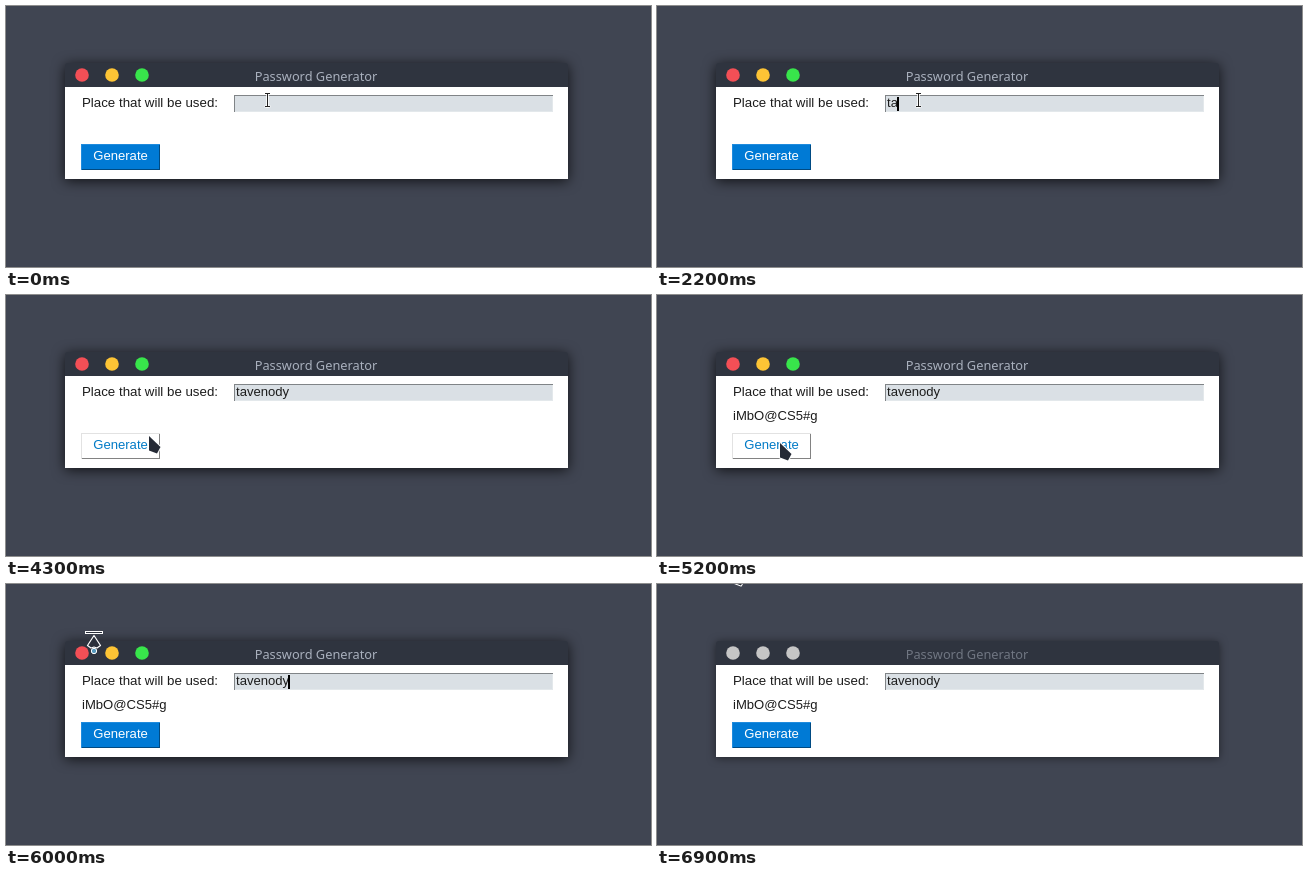
An HTML page with a canvas for the animation above (7.1 s loop, 645x261 px).

```html
<!DOCTYPE html>
<html lang="en">
<head>
<meta charset="utf-8">
<title>Password Generator</title>
<style>
  html, body { margin: 0; width: 100%; height: 100%; overflow: hidden; background: #404552; }
  canvas { display: block; }
</style>
</head>
<body>
<canvas id="stage" width="645" height="261"></canvas>
<script>
const ctx = document.getElementById('stage').getContext('2d');
const LOOP = 7100, STEP = 100;
const SANS = '"Liberation Sans", Arial, sans-serif';
const PLACE = 'tavenody', PASSWORD = 'iMbO@CS5#g';

const keyTimes = [2100, 2200, 2400, 2500, 2900, 3100, 3400, 3600];
const HOVER_IN = 4300, PRESS = 4700, RELEASE = 4900, HOVER_OUT = 5600, BLUR = 6900;

// Pointer stops: start time, shape, x, y
const pointer = [
  [0, beam, 261, 94], [4100, beam, 248, 97], [4200, arrow, 190, 119],
  [4300, arrow, 143, 141], [4400, arrow, 123, 148],
  [5500, arrow, 121, 142], [5600, arrow, 115, 126], [5700, arrow, 108, 110],
  [5800, arrow, 101, 95], [5900, arrow, 94, 78], [6000, resizeTop, 88, 48],
  [6100, arrow, 85, 30], [6200, arrow, 82, 7], [6300, arrow, 81, 0],
  [6400, arrow, 79, -6], [6500, arrow, 78, -11], [6600, arrow, 76, -16]
];

function rect(x, y, w, h, color) {
  ctx.fillStyle = color;
  ctx.fillRect(x, y, w, h);
}

function text(str, x, y, color, font = '13.1px ' + SANS, align = 'left') {
  ctx.font = font;
  ctx.textAlign = align;
  ctx.fillStyle = color;
  ctx.fillText(str, x, y);
}

function path(points, closed) {
  ctx.beginPath();
  points.forEach(([x, y]) => ctx.lineTo(x, y));
  if (closed) ctx.closePath();
}

function stroke(color, width) {
  ctx.strokeStyle = color;
  ctx.lineWidth = width;
  ctx.stroke();
}

function disc(x, y, r, fill, edge) {
  ctx.beginPath();
  ctx.arc(x, y, r, 0, Math.PI * 2);
  ctx.fillStyle = fill;
  ctx.fill();
  if (edge) stroke(edge, 1);
}

// One-pixel relief along the inside of a box
function bevel(x, y, w, h, lit, dark) {
  rect(x, y + h - 1, w, 1, dark);
  rect(x + w - 1, y, 1, h, dark);
  rect(x, y, w, 1, lit);
  rect(x, y, 1, h, lit);
}

function beam(x, y) {
  const shape = (grow, color) => {
    rect(x - grow, y - 6 - grow, 1 + 2 * grow, 13 + 2 * grow, color);
    for (const end of [-7, 6]) {
      rect(x - 2 - grow / 2, y + end - grow / 2, 5 + grow, 1 + grow, color);
    }
  };
  shape(1, 'rgba(255,255,255,.8)');
  shape(0, '#222');
}

function arrow(x, y) {
  path([[x, y], [x + 11.5, y + 11], [x + 8, y + 17.5], [x, y + 14.5]], true);
  ctx.lineJoin = 'round';
  stroke('#fff', 2);
  ctx.fillStyle = '#252a35';
  ctx.fill();
}

function resizeTop(x, y) {
  rect(x - 9, y - 1, 18, 3, '#fff');
  rect(x - 8, y, 16, 1, '#2b303b');
  path([[x, y + 3.5], [x + 6.5, y + 13.5], [x + 3, y + 16],
        [x, y + 15], [x - 3, y + 16], [x - 6.5, y + 13.5]], true);
  ctx.fillStyle = '#2b303b';
  ctx.fill();
  stroke('#fff', 1.2);
  disc(x, y + 19, 2.7, '#5699bd', '#fff');
}

function drawWindow(active) {
  ctx.save();
  ctx.shadowColor = active ? 'rgba(0,0,0,.75)' : 'rgba(0,0,0,.5)';
  ctx.shadowBlur = active ? 13 : 8;
  ctx.shadowOffsetY = active ? 2 : 1;
  ctx.beginPath();
  ctx.roundRect(59, 57, 503, 116, [3, 3, 0, 0]);
  ctx.fillStyle = '#2f343f';
  ctx.fill();
  ctx.restore();
  rect(59, 81, 503, 92, '#fff');

  const lights = active ? ['#f34f56', '#fdc435', '#38e54b'] : Array(3).fill('#c6c6c6');
  lights.forEach((color, i) => disc(76 + 30 * i, 69, 6.8, color));
  text('Password Generator', 310, 75, active ? '#a9b0bd' : '#707682',
       '500 12.8px "Noto Sans", sans-serif', 'center');
}

function drawEntry(typed, caret) {
  rect(228, 89, 319, 17, '#dae0e5');
  bevel(228, 89, 319, 17, '#808487', '#e3e8eb');
  text(typed, 230, 101, '#1c1c1c');
  if (caret) rect(229 + Math.round(ctx.measureText(typed).width), 91, 2, 14, '#000');
}

function drawButton(hover, pressed) {
  rect(75, 138, 79, 26, hover ? '#fff' : '#007ad5');
  if (pressed) bevel(75, 138, 79, 26, '#828282', '#e2e2e2');
  else if (hover) bevel(75, 138, 79, 26, '#e2e2e2', '#828282');
  else bevel(75, 138, 79, 26, '#1f8bdd', '#004a82');
  const shift = pressed ? 1 : 0;
  text('Generate', 114.5 + shift, 154 + shift, hover ? '#007ac6' : '#fff', undefined, 'center');
}

function draw(t) {
  const active = t < BLUR;
  const typed = PLACE.slice(0, keyTimes.filter(k => k <= t).length);
  // Caret blinks 600 ms on, 300 ms off
  const caret = active && t >= 100 && (t - 100) % 900 < 600;

  rect(0, 0, 645, 261, '#404552');
  drawWindow(active);
  text('Place that will be used:', 76, 101, '#1c1c1c', '13.3px ' + SANS);
  drawEntry(typed, caret);
  if (t >= RELEASE) text(PASSWORD, 76, 125, '#1c1c1c');
  drawButton(t >= HOVER_IN && t < HOVER_OUT, t >= PRESS && t < RELEASE);

  const [, shape, x, y] = pointer.findLast(p => p[0] <= t);
  shape(x, y);
}

const start = performance.now();
function tick() {
  const t = (performance.now() - start) % LOOP;
  draw(Math.floor(t / STEP) * STEP);
  requestAnimationFrame(tick);
}
tick();
</script>
</body>
</html>
```
